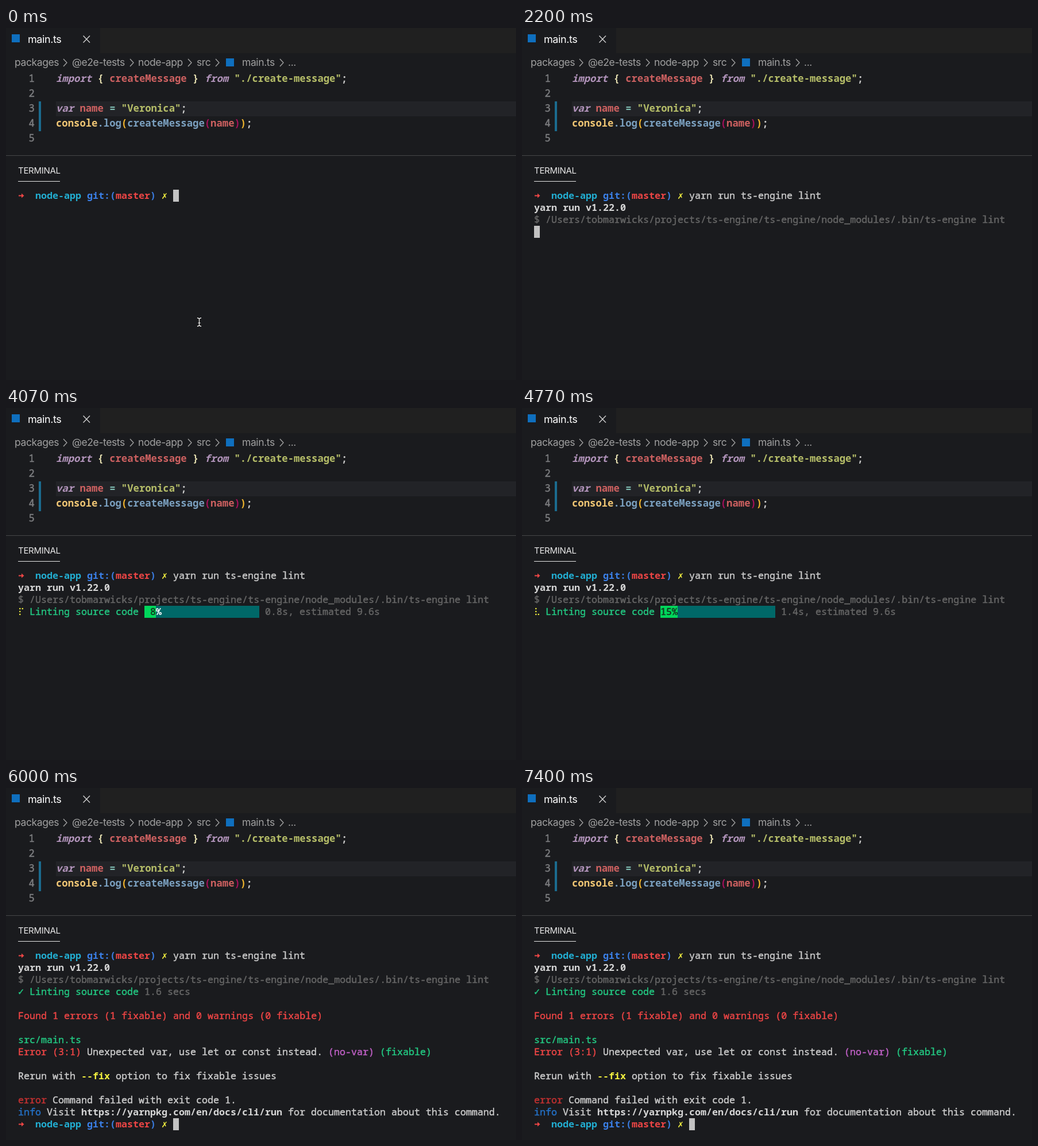
These frames come from a looping animation (888x614 px, 7430 ms). An HTML page with a canvas:

```html
<!DOCTYPE html>
<html>
<head>
<meta charset="utf-8">
<style>
html, body { margin: 0; width: 100%; height: 100%; overflow: hidden; background: #1a1b1e; }
canvas { display: block; }
</style>
</head>
<body>
<canvas id="stage" width="888" height="614"></canvas>
<script>
const c = document.getElementById('stage').getContext('2d');
const LOOP = 7430;
const MONO = '"Noto Sans Mono", "DejaVu Sans Mono", monospace';
const UI = 'Inter, "Open Sans", sans-serif';
const CELL = 10, ROW = 21, LEFT = 21, TOP = 282;

// Colours
const BG = '#1a1b1e', TEXT = '#cccccc', DIM = '#666666', RED = '#ec4545', GREEN = '#23c882',
  BLUE = '#3b80e8', CYAN = '#22aed2', YELLOW = '#f2f03f', MAGENTA = '#c060c6';
const KEY = '#b294bb', VAR = '#cc6060', STR = '#b5bd68', FN = '#7a9fbe', GOLD = '#f5b82e', PINK = '#a8105c';

const COMMAND = 'yarn run ts-engine lint';
const PATH = '$ /Users/tobmarwicks/projects/ts-engine/ts-engine/node_modules/.bin/ts-engine lint';

// Moments in ms
const TYPE_START = 60, TYPE_END = 1030, ENTER = 1230, BANNER = 1430, SCRIPT = 1490,
  LINT = 3265, TICK = 80, DONE = 4865, REPORT = 4895, PROMPT = 5030;
const ESTIMATE = 9.6;

function rect(x, y, w, h, color) {
  c.fillStyle = color;
  c.fillRect(x, y, w, h);
}

function line(color, width, ...points) {
  c.strokeStyle = color;
  c.lineWidth = width;
  c.beginPath();
  points.forEach(([x, y], i) => i ? c.lineTo(x, y) : c.moveTo(x, y));
  c.stroke();
}

function label(text, x, y, size, color) {
  c.font = `${size}px ${UI}`;
  c.letterSpacing = size > 16 ? '-0.4px' : '-0.3px';
  c.fillStyle = color;
  c.fillText(text, x, y);
  c.letterSpacing = '0px';
}

// Each part is [text, colour, font style]; regular text gets a hairline outline for a medium weight
function run(x, y, size, pitch, parts, weight) {
  c.lineWidth = 0.45;
  c.lineJoin = 'round';
  for (const [text, color, style = weight] of parts) {
    c.font = `${style} ${size}px ${MONO}`;
    c.fillStyle = c.strokeStyle = color;
    c.fillText(text, x, y);
    if (style === 500) c.strokeText(text, x, y);
    x += text.length * pitch;
  }
}

function code(n, ...parts) {
  run(87, 94 + 26 * n, 17.25, 10.35, parts, 600);
}

function term(row, col, ...parts) {
  run(LEFT + col * CELL, TOP + 16 + row * ROW, 16.68, CELL, parts, 500);
}

function block(row, col, cols, color) {
  rect(LEFT + col * CELL, TOP + row * ROW, cols * CELL, ROW, color);
}

function cursor(row, col) {
  block(row, col, 1, '#c2c2c2');
}

function editor() {
  rect(0, 0, 888, 614, BG);
  rect(164, 0, 724, 44, '#202020');
  rect(10, 11, 14, 14, '#0f6fbe');
  label('main.ts', 38, 26, 18, '#ffffff');
  line('#d0d0d0', 1.4, [134.5, 13.5], [146, 25.5]);
  line('#d0d0d0', 1.4, [146, 13.5], [134.5, 25.5]);

  const crumbs = [['packages', 15], ['@e2e-tests', 115], ['node-app', 230], ['src', 332], ['main.ts', 411], ['...', 491]];
  for (const [text, x] of crumbs) label(text, x, 66, 17.5, '#a0a0a0');
  for (const x of [100, 216, 317, 365, 477]) line('#a0a0a0', 1.4, [x, 54], [x + 6, 60.5], [x, 67]);
  rect(383, 53, 14, 14, '#0f6fbe');

  rect(87, 128, 801, 26, '#222327');
  rect(57, 128, 4, 52, '#1b6b8f');
  for (let n = 0; n < 5; n++) run(39.5, 94 + 26 * n, 17.25, 10.35, [[String(n + 1), '#7d7e80']], 500);

  code(0, ['import', KEY, 'italic 600'], [' { ', '#e2dcae'], ['createMessage', VAR], [' } ', '#e2dcae'],
    ['from', KEY, 'italic 600'], [' "./create-message"', STR], [';', TEXT]);
  code(2, ['var', KEY, 'italic 600'], [' name', VAR], [' = ', '#7fbcb2'], ['"Veronica"', STR], [';', TEXT]);
  code(3, ['console', '#f0c674'], ['.log', FN], ['(', GOLD], ['createMessage', FN], ['(', PINK],
    ['name', VAR], [')', PINK], [')', GOLD], [';', TEXT]);

  rect(0, 222, 888, 1, '#454648');
  label('TERMINAL', 21, 254, 15, '#e7e7e7');
  rect(21, 267, 73, 1, '#e7e7e7');
}

function prompt(row) {
  const y = TOP + row * ROW + 10.5;
  line(RED, 2, [22, y], [28, y]);
  c.fillStyle = RED;
  c.beginPath();
  c.moveTo(27, y - 4);
  c.lineTo(31.5, y);
  c.lineTo(27, y + 4);
  c.fill();
  term(row, 3, ['node-app ', CYAN, 700], ['git:(', BLUE, 700], ['master', RED, 700], [') ', BLUE, 700], ['✗', YELLOW, 700]);
}

function pointer() {
  for (const [color, width] of [['#101010', 3.5], ['#e8e8e8', 1.4]]) {
    line(color, width, [333, 505.5], [336.5, 507], [340, 505.5]);
    line(color, width, [333, 520.5], [336.5, 519], [340, 520.5]);
    line(color, width, [336.5, 507], [336.5, 519]);
  }
  line('#e8e8e8', 1.2, [334.5, 514.5], [338.5, 514.5]);
}

// Braille spinner: dots numbered down the left column, then the right
function spinner(step) {
  const shape = ['124', '145', '1456', '456', '3456', '356', '236', '1236', '123', '1234'][step % 10];
  c.fillStyle = YELLOW;
  for (const d of shape) {
    const i = d - 1;
    c.beginPath();
    c.arc(i < 3 ? 24.3 : 28.8, TOP + 3 * ROW + 5 + (i % 3) * 5, 1.3, 0, 7);
    c.fill();
  }
}

function progress(t) {
  const tick = Math.floor((t - LINT) / TICK);
  const secs = tick * TICK / 1000, part = secs / ESTIMATE;
  const filled = Math.round(part * 20);
  const percent = (Math.round(part * 100) + '%').padStart(3);
  spinner(tick - 1);
  term(3, 2, ['Linting source code', GREEN]);
  block(3, 22, 20, '#006868');
  block(3, 22, filled, '#00d65b');
  term(3, 22, [percent.slice(0, filled), '#12351f'], [percent.slice(filled), '#ffffff', 700]);
  term(3, 43, [`${secs.toFixed(1)}s, estimated ${ESTIMATE}s`, DIM]);
}

function report() {
  term(5, 0, ['Found 1 errors (1 fixable) and 0 warnings (0 fixable)', RED]);
  term(7, 0, ['src/main.ts', GREEN]);
  term(8, 0, ['Error (3:1) ', RED], ['Unexpected var, use let or const instead. ', TEXT],
    ['(no-var) ', MAGENTA], ['(fixable)', GREEN]);
  term(10, 0, ['Rerun with ', TEXT], ['--fix', YELLOW, 700], [' option to fix fixable issues', TEXT]);
  term(12, 0, ['error', '#c23131'], [' Command failed with exit code 1.', TEXT]);
  term(13, 0, ['info', '#2472c8'], [' Visit ', TEXT], ['https://yarnpkg.com/en/docs/cli/run', '#d6d6d6', 700],
    [' for documentation about this command.', TEXT]);
}

function terminal(t) {
  const share = Math.min(1, Math.max(0, (t - TYPE_START) / (TYPE_END - TYPE_START)));
  const typed = Math.ceil(share * COMMAND.length);
  prompt(0);
  term(0, 27, [COMMAND.slice(0, typed), TEXT]);
  if (!typed) pointer();
  if (t < ENTER) return cursor(0, 27 + typed);

  if (t >= BANNER) term(1, 0, ['yarn run v1.22.0', '#d6d6d6', 700]);
  if (t >= SCRIPT) term(2, 0, [PATH, DIM]);
  if (t < LINT + TICK) return cursor(t < BANNER ? 1 : t < SCRIPT ? 2 : 3, 0);
  if (t < DONE) return progress(t);

  term(3, 0, ['✓ Linting source code', GREEN], [' 1.6 secs', DIM]);
  if (t < REPORT) return cursor(5, 0);
  report();
  if (t < PROMPT) return cursor(14, 0);
  prompt(14);
  cursor(14, 27);
}

function draw() {
  editor();
  terminal(performance.now() % LOOP);
  requestAnimationFrame(draw);
}
draw();
</script>
</body>
</html>
```
